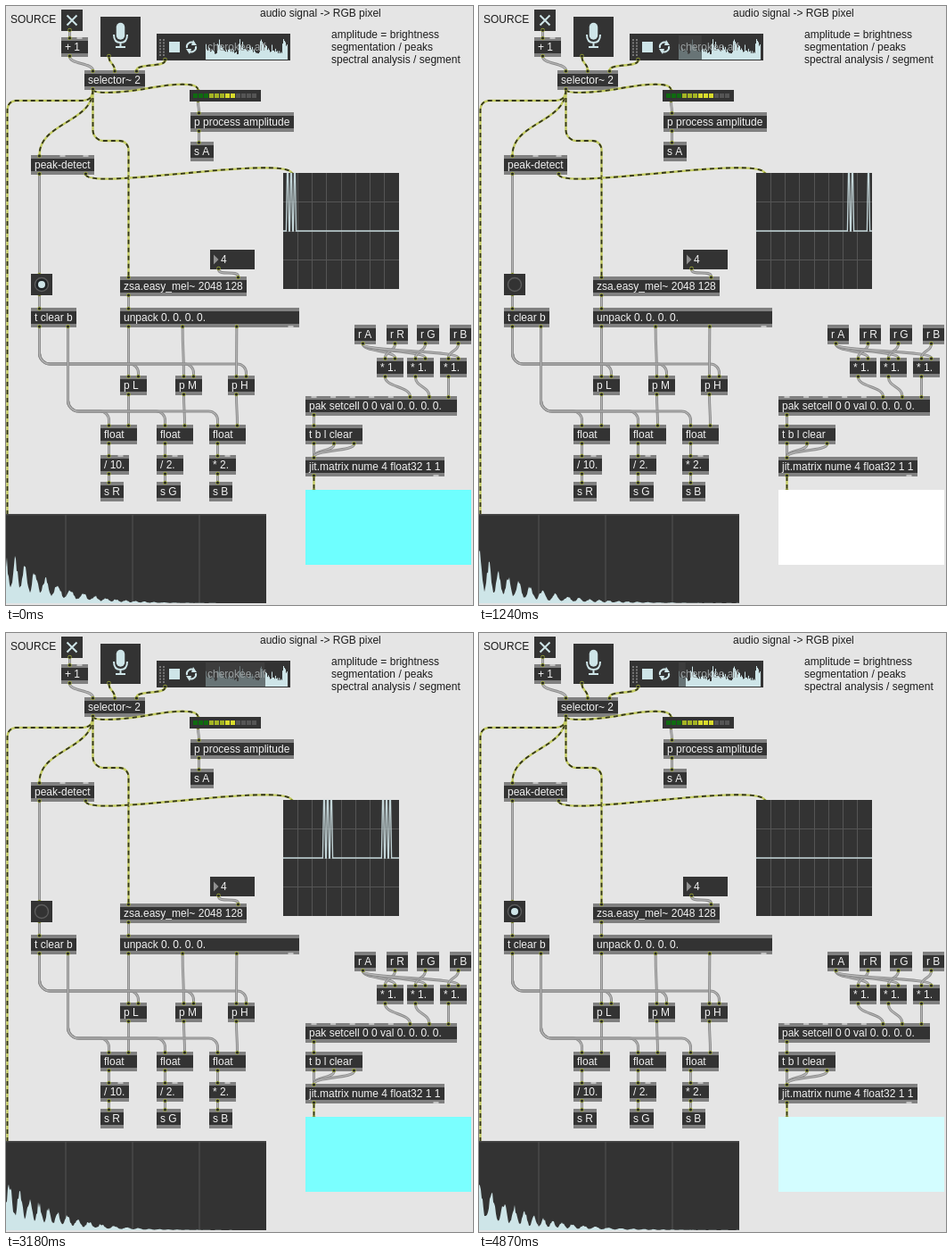
An HTML page with a canvas for the animation above (4950 ms loop, 524 px wide and 671 px high).

```html
<!DOCTYPE html>
<html lang="en">
<head>
<meta charset="utf-8">
<title>Audio signal to RGB pixel</title>
<style>
html, body { margin: 0; width: 100%; height: 100%; overflow: hidden; background: #e5e5e5; }
canvas { display: block; }
</style>
</head>
<body>
<canvas id="stage" width="524" height="671"></canvas>
<script>
const W = 524, H = 671, LOOP = 4950, STEPS = 64;
const DARK = '#333333', BAND = '#808080', GRID = '#555555', PALE = '#cee5e8', INK = '#1c1c1c';
const FONT = '12px "Liberation Sans", Arial, sans-serif';
const ctx = document.getElementById('stage').getContext('2d');
const patch = document.createElement('canvas');
patch.width = W;
patch.height = H;
const pen = patch.getContext('2d');
pen.font = ctx.font = FONT;

function rect(c, color, x, y, w, h) {
  c.fillStyle = color;
  c.fillRect(x, y, w, h);
}

function text(c, str, x, y, color) {
  c.fillStyle = color;
  c.fillText(str, x, y);
}

function disc(c, color, x, y, r) {
  c.fillStyle = color;
  c.beginPath();
  c.arc(x, y, r, 0, Math.PI * 2);
  c.fill();
}

function trace(c, path, color, width) {
  c.strokeStyle = color;
  c.lineWidth = width;
  c.stroke(path instanceof Path2D ? path : new Path2D(path));
}

function noise(a, b) {
  const v = Math.sin(a * 12.9898 + b * 78.233) * 43758.5453;
  return v - Math.floor(v);
}

// ---- static patch: boxes with evenly spaced ports, joined by cords ----

const boxes = {};
const cords = [];

function area(id, x, y, w, h, ins = 1, outs = 1) {
  boxes[id] = { x, y, w, h, ins, outs, used: new Set() };
}

function box(label, x, y, ins, outs, w, id = label) {
  const fitted = Math.ceil(pen.measureText(label).width) + 8;
  area(id, x, y, w ?? Math.max(fitted, ins > 1 ? 30 : 0), 22, ins, outs);
  boxes[id].label = label;
}

function portX({ x, w }, i, count) {
  return x + 9.5 + (count > 1 ? i * (w - 19) / (count - 1) : 0);
}

function curve(x0, y0, x1, y1) {
  const d = Math.max(8, (y1 - y0) / 2);
  return new Path2D(`M${x0} ${y0}C${x0} ${y0 + d} ${x1} ${y1 - d} ${x1} ${y1}`);
}

function elbow(x0, y0, x1, y1, mid) {
  const path = new Path2D();
  path.moveTo(x0, y0);
  path.arcTo(x0, mid, x1, mid, 12);
  path.arcTo(x1, mid, x1, y1, 10);
  path.lineTo(x1, y1);
  return path;
}

function link(from, out, to, inlet, { signal = false, mid, via } = {}) {
  const a = boxes[from], b = boxes[to];
  const ends = [portX(a, out, a.outs), a.y + a.h, portX(b, inlet, b.ins), b.y];
  const path = via ? new Path2D(via) : mid ? elbow(...ends, mid) : curve(...ends);
  a.used.add('out' + out);
  b.used.add('in' + inlet);
  cords.push({ path, signal });
}

function buildPatch() {
  const signal = true;
  area('toggle', 62, 4, 24, 24);
  area('mic', 106, 12, 45, 45);
  area('player', 169, 31, 150, 30);
  area('meter', 206, 94, 80, 13);
  area('bang', 28, 300, 24, 24);
  area('number', 229, 273, 50, 22, 1, 2);
  area('scope', 311, 187, 130, 130);
  area('panel', 336, 542, 186, 84);

  box('+ 1', 62, 35, 2, 1);
  box('selector~ 2', 88, 72, 3, 1);
  box('p process amplitude', 207, 119, 1, 1);
  box('s A', 207, 152, 1, 0);
  box('peak-detect', 28, 167, 3, 2);
  box('zsa.easy_mel~ 2048 128', 128, 303, 2, 1);
  box('t clear b', 28, 338, 1, 2);
  box('unpack 0. 0. 0. 0.', 128, 338, 1, 4, 201);
  box('pak setcell 0 0 val 0. 0. 0. 0.', 336, 437, 8, 1, 170, 'pak');
  box('t b l clear', 336, 469, 1, 3, 64);
  box('jit.matrix nume 4 float32 1 1', 336, 505, 1, 2, 156, 'matrix');
  box('r A', 391, 357, 0, 1);

  link('toggle', 0, '+ 1', 0);
  link('+ 1', 0, 'selector~ 2', 0);
  link('meter', 0, 'p process amplitude', 0);
  link('p process amplitude', 0, 's A', 0);
  link('peak-detect', 0, 'bang', 0);
  link('bang', 0, 't clear b', 0);
  link('number', 0, 'zsa.easy_mel~ 2048 128', 1);
  link('zsa.easy_mel~ 2048 128', 0, 'unpack 0. 0. 0. 0.', 0);
  link('pak', 0, 't b l clear', 0);

  const scales = ['/ 10.', '/ 2.', '* 2.'];
  ['R', 'G', 'B'].forEach((channel, i) => {
    const left = [106, 169, 228][i], top = [128, 190, 249][i], right = [416, 450, 487][i];
    const band = 'p ' + 'LMH'[i], value = 'float' + i, send = 's ' + channel;
    const receive = 'r ' + channel, gain = 'gain' + i;
    box(band, top, 414, 2, 1);
    box('float', left, 469, 2, 1, 41, value);
    box(scales[i], left, 503, 2, 1);
    box(send, left, 533, 1, 0);
    box(receive, [427, 461, 498][i], 357, 0, 1);
    box('* 1.', right, 394, 2, 1, 30, gain);

    link('t clear b', 0, band, 1, { mid: 401 });
    link('t clear b', 1, value, 0, { mid: 454 });
    link('unpack 0. 0. 0. 0.', i, band, 0);
    link(band, 0, value, 1);
    link(value, 0, scales[i], 0);
    link(scales[i], 0, send, 0);
    link('r A', 0, gain, 1);
    link(receive, 0, gain, 0);
    link(gain, 0, 'pak', 5 + i);
    link('t b l clear', i, 'matrix', 0);
  });

  link('mic', 0, 'selector~ 2', 1, { signal });
  link('player', 0, 'selector~ 2', 2, { signal });
  link('selector~ 2', 0, 'peak-detect', 0, { signal });
  link('selector~ 2', 0, 'zsa.easy_mel~ 2048 128', 0, { signal, mid: 151 });
  link('selector~ 2', 0, 'meter', 0,
    { signal, via: 'M97.5 94C99 99 135 97 160 92C188 87 215 85 215.5 94' });
  link('peak-detect', 1, 'scope', 0,
    { signal, via: 'M89.5 189C92 198 150 192 205 187C255 182 317 177 320.5 187' });
  link('matrix', 0, 'panel', 0, { signal });
  const toSpectrum = 'M97.5 94C97 104 92 106 84 106L11 106Q1.5 107 1.5 117L1.5 569';
  cords.push({ path: new Path2D(toSpectrum), signal });
}

function drawIcons(c) {
  for (const id of ['toggle', 'mic', 'player', 'number']) {
    const { x, y, w, h } = boxes[id];
    rect(c, DARK, x, y, w, h);
  }
  trace(c, 'M68.5 10.5L79.5 21.5M79.5 10.5L68.5 21.5', PALE, 2);
  c.lineCap = 'round';
  trace(c, 'M128.5 23.5L128.5 33', PALE, 9.5);
  c.lineCap = 'butt';
  trace(c, 'M121 32Q121 41 128.5 41Q136 41 136 32M128.5 41L128.5 46M123 46L134 46', PALE, 2);

  for (let i = 0; i < 12; i++) rect(c, '#777777', 172 + i % 2 * 4, 37 + (i >> 1) * 3.4, 2, 2);
  rect(c, PALE, 183, 40, 12, 12);
  trace(c, 'M203 47A5.2 5.2 0 0 1 211 41.5M213 45A5.2 5.2 0 0 1 205 50.5', PALE, 2);
  c.fillStyle = PALE;
  c.fill(new Path2D('M210 38L214 44L208 44ZM206 54L202 48L208 48Z'));
  c.fillStyle = '#909090';
  c.fill(new Path2D('M233 278.5L238.5 284L233 289.5Z'));
  text(c, '4', 241, 288, '#f2f2f2');
}

function drawPorts(c, item) {
  const mark = (side, count, y) => {
    for (let i = 0; i < count; i++) {
      const x = portX(item, i, count);
      if (item.used.has(side + i)) {
        disc(c, '#a4b03a', x, y, 2.2);
        disc(c, '#282828', x, y, 1.6);
      } else if (item.label) {
        rect(c, '#c4c4c4', x - 3, y - 1, 6, 2);
      }
    }
  };
  mark('in', item.ins, item.y + 1);
  mark('out', item.outs, item.y + item.h - 1);
}

function drawPatch(c) {
  rect(c, '#e5e5e5', 0, 0, W, H);
  text(c, 'SOURCE', 5, 19, INK);
  text(c, 'audio signal -> RGB pixel', 285, 12, INK);
  ['amplitude = brightness', 'segmentation / peaks', 'spectral analysis / segment']
    .forEach((line, i) => text(c, line, 365, 36 + i * 14, INK));
  drawIcons(c);
  for (const { label, x, y, w } of Object.values(boxes)) {
    if (!label) continue;
    rect(c, BAND, x, y, w, 22);
    rect(c, DARK, x, y + 4, w, 14);
    text(c, label, x + 4, y + 15, '#f2f2f2');
  }
  for (const { path, signal } of cords) {
    trace(c, path, signal ? '#c3cb62' : '#8a8a8a', signal ? 2.4 : 3);
    if (signal) c.setLineDash([5, 4]);
    trace(c, path, signal ? '#33351c' : '#b6b6b6', signal ? 1.8 : 1.2);
    c.setLineDash([]);
  }
  Object.values(boxes).forEach(item => drawPorts(c, item));
}

// ---- moving parts ----

const latest = (states, t) => states.findLast(s => s[0] <= t);

function waveHeight(x) {
  const d = x - 224, hit = Math.floor(d / 12.2);
  const size = hit % 2 ? 25 : 14;
  return 1 + (3 + size * Math.exp((hit * 12.2 - d) / 10)) * (0.6 + 0.4 * noise(x, 3));
}

function drawPlayer(t) {
  const head = Math.min(316, 224 + 0.0209 * (t % 4500));
  rect(ctx, '#3d3d3d', 224, 33, head - 224, 27);
  for (let x = 224; x < 316; x++) {
    const h = Math.min(27, waveHeight(x));
    rect(ctx, x < head ? '#687476' : PALE, x, 60 - h, 1, h);
  }
  text(ctx, 'cherokee.aif', 226, 50, '#9a9fa0');
}

// How wide the sound spreads over the spectrum: 0 is a plucked tone, 1 is noise.
const BREADTH = [[0, 0.15], [480, 0.5], [1240, 0], [2470, 1], [3180, 0.1], [4410, 1], [4870, 0]];

function breadthAt(t) {
  const i = BREADTH.findLastIndex(key => key[0] <= t);
  const [t0, b0] = BREADTH[i], [t1, b1] = BREADTH[i + 1] ?? [LOOP, 0.15];
  return b0 + (b1 - b0) * (t - t0) / (t1 - t0);
}

function drawMeter(breadth) {
  const level = Math.round(8.6 - 2.6 * breadth);
  rect(ctx, DARK, 206, 94, 80, 13);
  for (let i = 0; i < 12; i++) {
    const lit = i < 3 ? '#0f6a10' : i < 6 ? '#a4b424' : '#d9dc2c';
    rect(ctx, i < level ? lit : GRID, 210 + i * 6, 98, 5, 5);
  }
}

function drawSpectrum(t, breadth) {
  const reach = 50 + 75 * breadth, power = 1 + 2 * breadth;
  const depth = 0.7 - 0.5 * breadth, top = 57 - 12 * breadth;
  rect(ctx, DARK, 0, 569, 292, 100);
  rect(ctx, '#484848', 0, 569, 292, 1.5);
  for (let i = 0; i < 3; i++) rect(ctx, GRID, 66.5 + i * 75, 570, 1, 99);
  ctx.fillStyle = PALE;
  ctx.beginPath();
  ctx.moveTo(0, 669);
  for (let x = 0; x < 292; x++) {
    const envelope = top * Math.exp(-((x / reach) ** power));
    const attack = 1 - 0.6 * breadth * Math.exp(-x / 8);
    const ripple = 1 - depth * (0.5 - 0.5 * Math.cos(x * 0.52 + 2 * Math.sin(x / 23 + t)));
    ctx.lineTo(x, 669 - envelope * attack * ripple * (0.8 + 0.3 * noise(x, t)));
  }
  ctx.lineTo(292, 669);
  ctx.fill();
}

// Time, then bursts of evenly spaced peaks as [x, count].
const SCOPES = [
  [0, [316, 3]],
  [300, [415, 2], [437, 1]],
  [1380, ],
  [2300, [313, 5], [379, 1]],
  [2540, [357, 3], [423, 3]],
  [4100]
];

function drawScope(t) {
  const { x, y, w, h } = boxes.scope;
  rect(ctx, DARK, x, y, w, h);
  for (let i = 1; i < 8; i++) rect(ctx, GRID, Math.floor(x + i * w / 8), y, 1, h);
  for (let i = 1; i < 4; i++) rect(ctx, GRID, x, Math.floor(y + i * h / 4), w, 1);
  let line = 'M311 252';
  for (const [start, count] of latest(SCOPES, t).slice(1)) {
    for (let i = 0; i < count; i++) {
      const p = start + i * 4;
      line += `L${p - 1.6} 252L${p - 0.5} 187.5L${p + 0.5} 187.5L${p + 1.6} 252`;
    }
  }
  trace(ctx, line + 'L441 252', '#c4d6d9', 1.3);
}

const COLORS = [
  [0, '#6effff'], [300, '#ffffff'], [760, '#d3fdff'], [920, '#ffffff'],
  [2540, '#7affff'], [4400, '#4fe5ff'], [4480, '#8cf2ff'], [4860, '#d3fdff']
];
const BANGS = [[0, 140], [760, 840], [2540, 2620], [4860, LOOP]];

function drawPanel(t) {
  const { x, y, w, h } = boxes.panel;
  rect(ctx, latest(COLORS, t)[1], x, y, w, h);
}

function drawBang(t) {
  rect(ctx, DARK, 28, 300, 24, 24);
  const lit = BANGS.some(([on, off]) => t >= on && t < off);
  if (lit) disc(ctx, '#202426', 40, 312, 7.5);
  ctx.beginPath();
  ctx.arc(40, 312, 7.5, 0, Math.PI * 2);
  ctx.strokeStyle = '#5c5c5c';
  ctx.lineWidth = 1.4;
  ctx.stroke();
  if (lit) disc(ctx, PALE, 40, 312, 4);
}

function render(now) {
  const step = Math.floor((now % LOOP + 8) * STEPS / LOOP) % STEPS;
  const t = step * LOOP / STEPS;
  const breadth = breadthAt(t);
  ctx.drawImage(patch, 0, 0);
  drawPlayer(t);
  drawMeter(breadth);
  drawScope(t);
  drawBang(t);
  drawPanel(t);
  drawSpectrum(t, breadth);
}

buildPatch();
drawPatch(pen);
const begin = performance.now();
function tick() {
  render(performance.now() - begin);
  requestAnimationFrame(tick);
}
tick();
</script>
</body>
</html>
```
